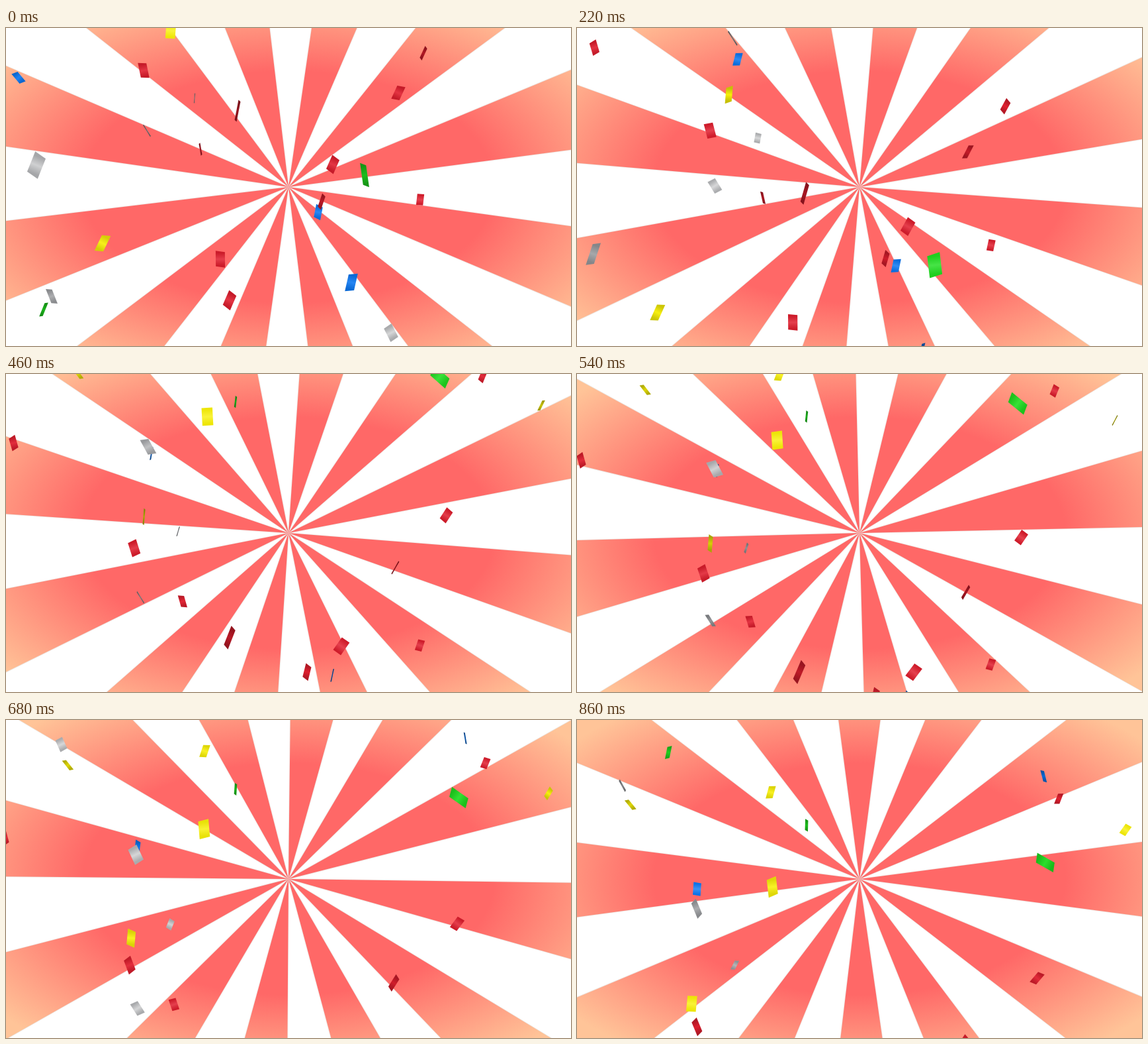
Recreate the animation shown at these times as an HTML page with a canvas. Size 854 px wide and 480 px high, loop 960 ms.

```html
<!DOCTYPE html>
<html lang="en">
<head>
<meta charset="utf-8">
<title>Confetti over turning rays</title>
<style>
  html, body { margin: 0; width: 100%; height: 100%; overflow: hidden; background: #fff; }
  canvas { display: block; width: 854px; height: 480px; }
</style>
</head>
<body>
<canvas id="stage" width="854" height="480"></canvas>
<script>
const ctx = document.getElementById('stage').getContext('2d');
const W = 854, H = 480, CX = W / 2, CY = H / 2;
const LOOP = 960, LAST = 860, STEP = 20;
const RAYS = 12, SEAM = -29.4, TURN = 121.3;
const RAD = Math.PI / 180;

let seed = 7;
function random() {
  seed = (seed * 16807) % 2147483647;
  return seed / 2147483647;
}

// Each throw is a start point, sideways drift and fall in px/s.
// Nearer papers fall faster and look larger; the tumble is random.
const pieces = [];
function scatter(hue, sat, light, ...throws) {
  for (const [x, y, drift, fall] of throws) {
    pieces.push({
      hue, sat, light, x, y, drift, fall,
      size: fall / (y < 0 ? 18 : 23),
      angle: 50 + 70 * random(),
      spin: 60 * (random() - 0.5),
      flip: 180 * random() - 90,
      rate: 450 * random() ** 2
    });
  }
}

scatter(212, 90, 48,
  [19, 75, -133, 334], [472, 278, 46, 352], [522, 384, -5, 455],
  [264, -14, -96, 267], [652, -161, 62, 244]);

scatter(355, 76, 46,
  [631, 38, 75, 349], [593, 98, -10, 387], [494, 206, 28, 408],
  [477, 262, -48, 374], [294, 183, -59, 319], [350, 125, -26, 543],
  [324, 349, 10, 415], [338, 411, -50, 423], [626, 259, -1, 300],
  [208, 64, -31, 396], [40, -33, -62, 273], [711, -111, 20, 228]);

scatter(58, 94, 48,
  [249, 4, -88, 421], [146, 325, -110, 455], [315, -122, -23, 371],
  [786, -70, 50, 234], [141, -128, -70, 254], [329, -157, -42, 264]);

scatter(120, 74, 48,
  [542, 222, -6, 592], [57, 425, -75, 390], [347, -74, 0, 231],
  [596, -205, 130, 417], [207, -210, -80, 257]);

scatter(220, 2, 68,
  [46, 207, -97, 584], [213, 155, -21, 363], [285, 106, -54, 262],
  [582, 460, 0, 400], [69, 405, -90, 407], [254, -64, -85, 346],
  [140, -167, -83, 264]);

const glow = ctx.createRadialGradient(0, 0, 0, 0, 0, 1.4);
glow.addColorStop(0.52, '#ff6867');
glow.addColorStop(0.95, '#ffc498');

function drawRays(s) {
  ctx.beginPath();
  for (let i = 0; i < RAYS; i++) {
    // rays crowd slightly towards the seam of the wheel
    const d = i - (RAYS - 1) / 2;
    const mid = SEAM + TURN * s + d * 360 / RAYS - 0.3 / d;
    ctx.moveTo(CX, CY);
    for (const side of [-7.5, 7.5]) {
      const a = (mid + side) * RAD;
      ctx.lineTo(CX + W * Math.cos(a), CY + W * Math.sin(a));
    }
    ctx.closePath();
  }
  ctx.strokeStyle = 'rgba(190, 172, 160, .3)';
  ctx.lineWidth = 1.5;
  ctx.stroke();
  ctx.save();
  ctx.translate(CX, CY);
  ctx.scale(CX, CY);
  ctx.fillStyle = glow;
  ctx.fill();
  ctx.restore();
}

function drawPiece(p, s) {
  const f = (p.flip + p.rate * s) * RAD;
  const face = Math.abs(Math.cos(f));
  const l = p.size * 0.65;
  const w = p.size * 0.4 * Math.max(face, 0.12);
  const skew = p.size * 0.12 * Math.sin(2 * f);
  const tone = k => `hsl(${p.hue}, ${p.sat}%, ${p.light * k}%)`;
  const shade = 0.5 + 0.5 * face;

  ctx.save();
  ctx.translate(p.x + p.drift * s, p.y + p.fall * (s + 0.2 * s * s));
  ctx.rotate((p.angle + p.spin * s) * RAD);
  const shine = ctx.createLinearGradient(-l, 0, l, 0);
  shine.addColorStop(0.1, tone(shade));
  shine.addColorStop(0.5, tone(shade * 1.25));
  shine.addColorStop(0.9, tone(shade));
  ctx.fillStyle = shine;
  ctx.beginPath();
  ctx.moveTo(-l - skew, -w);
  ctx.lineTo(l - skew, -w);
  ctx.lineTo(l + skew, w);
  ctx.lineTo(-l + skew, w);
  ctx.fill();
  ctx.restore();
}

function frame() {
  const ms = performance.now() % LOOP;
  const s = Math.min(LAST, Math.floor(ms / STEP) * STEP) / 1000;
  ctx.fillStyle = '#fff';
  ctx.fillRect(0, 0, W, H);
  drawRays(s);
  for (const p of pieces) drawPiece(p, s);
  requestAnimationFrame(frame);
}
frame();
</script>
</body>
</html>
```
